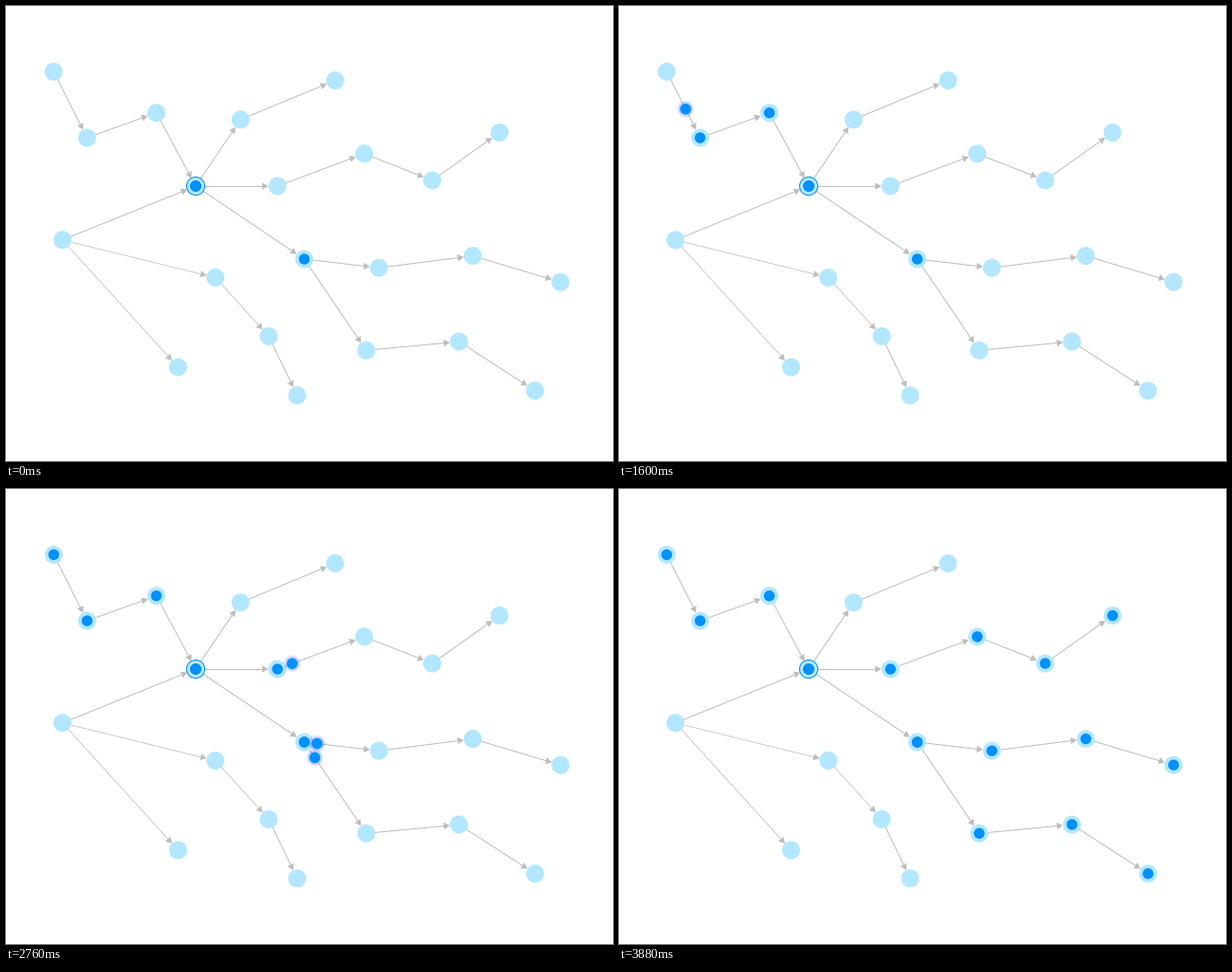
Recreate the animation shown at these times as a matplotlib script. Size 640 by 480 pixels, loop 4560 ms.

```python
import numpy as np
import matplotlib.pyplot as plt
from matplotlib.animation import FuncAnimation
from matplotlib.patches import Circle, Polygon

W, H, DPI = 640, 480, 100
STEP, FRAMES = 40, 114
PX = 72 / DPI
PALE, BLUE, GREY, GLOW = "#b3e7ff", "#0090ff", "#bdbdbd", "#2a5cff"
R_NODE, R_DOT = 9.5, 5.7

NODES = dict(
    hub=(200, 190),
    a1=(158.5, 112.7), a2=(85.5, 139), a3=(50.3, 69.3),
    b1=(247.3, 119.8), b2=(347, 78.5),
    c1=(286.2, 190), c2=(377.7, 155.8), c3=(449.4, 184), c4=(520.4, 133.5),
    d1=(314.5, 267), d2=(393.2, 276.2), d3=(492.2, 263.6), d4=(584.7, 291.2),
    e2=(379.8, 363.3), e3=(477.6, 354), e4=(557.8, 405.8),
    s=(59.5, 246.8), s1=(181.4, 381),
    t1=(220.8, 286.5), t2=(277, 348.4), t3=(307, 410.8),
)
NODES = {k: np.array(v, float) for k, v in NODES.items()}

CHAINS = ["a3 a2 a1 hub", "s hub b1 b2", "hub c1 c2 c3 c4", "hub d1 d2 d3 d4",
          "d1 e2 e3 e4", "s s1", "s t1 t2 t3"]
THIN = {("s", "s1"), ("t1", "t2"), ("s", "t1")}

UP = ["hub a1 a2 a3".split()]
DOWN = [p.split() for p in ("hub c1 c2 c3 c4", "hub d1 d2 d3 d4", "hub d1 e2 e3 e4")]

# (time in ms, hops travelled)
UP_KEYS = np.array([(400, 0), (1000, .765), (1600, 2.435), (1900, 3)])
DOWN_KEYS = np.array([(2000, 0), (2360, .253), (2760, 1.17), (3160, 2.503), (3700, 4)])
TURN, END = 2040, 3880


def glide(keys, t):
    """Smooth curve through the keys, at rest on both ends."""
    x, y = keys.T
    t = np.clip(t, x[0], x[-1])
    m = np.gradient(y, x)
    m[0] = m[-1] = 0
    i = min(np.searchsorted(x, t, side="right") - 1, len(x) - 2)
    h = x[i + 1] - x[i]
    s = (t - x[i]) / h
    return (y[i] * (1 + 2 * s) * (1 - s) ** 2 + m[i] * h * s * (1 - s) ** 2
            + y[i + 1] * s * s * (3 - 2 * s) + m[i + 1] * h * s * s * (s - 1))


def along(path, hops):
    k = min(int(hops), len(path) - 2)
    f = hops - k
    if path[1] == "c1" and k == 0:
        f **= .9  # the short first hop runs slightly ahead
    a, b = NODES[path[k]], NODES[path[k + 1]]
    return a + (b - a) * f


fig = plt.figure(figsize=(W / DPI, H / DPI), dpi=DPI, facecolor="white")
ax = fig.add_axes([0, 0, 1, 1])
ax.set_xlim(0, W)
ax.set_ylim(H, 0)
ax.axis("off")


def disc(pos, r, color, z, **kw):
    return ax.add_patch(Circle(pos, r, fc=color, lw=0, zorder=z, **kw))


def arrow(a, b):
    p, q = NODES[a], NODES[b]
    d = (q - p) / np.hypot(*(q - p))
    n = np.array([-d[1], d[0]])
    tip = q - d * 9.5
    base = tip - d * 6.5
    width = .75 if (a, b) in THIN else 1
    ax.plot(*zip(p, base), color=GREY, lw=width * PX, zorder=1)
    ax.add_patch(Polygon([tip, base + n * 3.6, base - n * 3.6], fc=GREY, lw=0, zorder=1))


for chain in CHAINS:
    names = chain.split()
    for a, b in zip(names, names[1:]):
        arrow(a, b)

for pos in NODES.values():
    disc(pos, R_NODE, PALE, 2)
ax.add_patch(Circle(NODES["hub"], 9.6, fill=False, ec=BLUE, lw=PX, zorder=3))

fills = {k: disc(NODES[k], R_DOT, BLUE, 4)
         for path in UP + DOWN for k in path}
movers = [[disc((0, 0), r, GLOW, 5, alpha=.09) for r in (9, 8.2, 7.4, 6.6)]
          + [disc((0, 0), R_DOT, BLUE, 6)] for _ in DOWN]


def draw(i):
    t = i * STEP
    up, down = glide(UP_KEYS, t), glide(DOWN_KEYS, t)
    if t < 400 or t >= END:
        spots = []
    elif t < TURN:
        spots = [along(p, up) for p in UP]
    else:
        spots = [along(p, down) for p in DOWN]

    reached = {"hub"}
    for paths, hops in ((UP, up), (DOWN, down)):
        for path in paths:
            reached.update(path[:int(hops + .03) + 1])
    for name, dot in fills.items():
        dot.set_visible(name in reached)

    for k, parts in enumerate(movers):
        for part in parts:
            part.set_visible(k < len(spots))
            if k < len(spots):
                part.center = spots[k]
    return []


anim = FuncAnimation(fig, draw, frames=FRAMES, interval=STEP,
                     init_func=lambda: draw(0), repeat=True, repeat_delay=0, blit=False)
plt.show()
```
